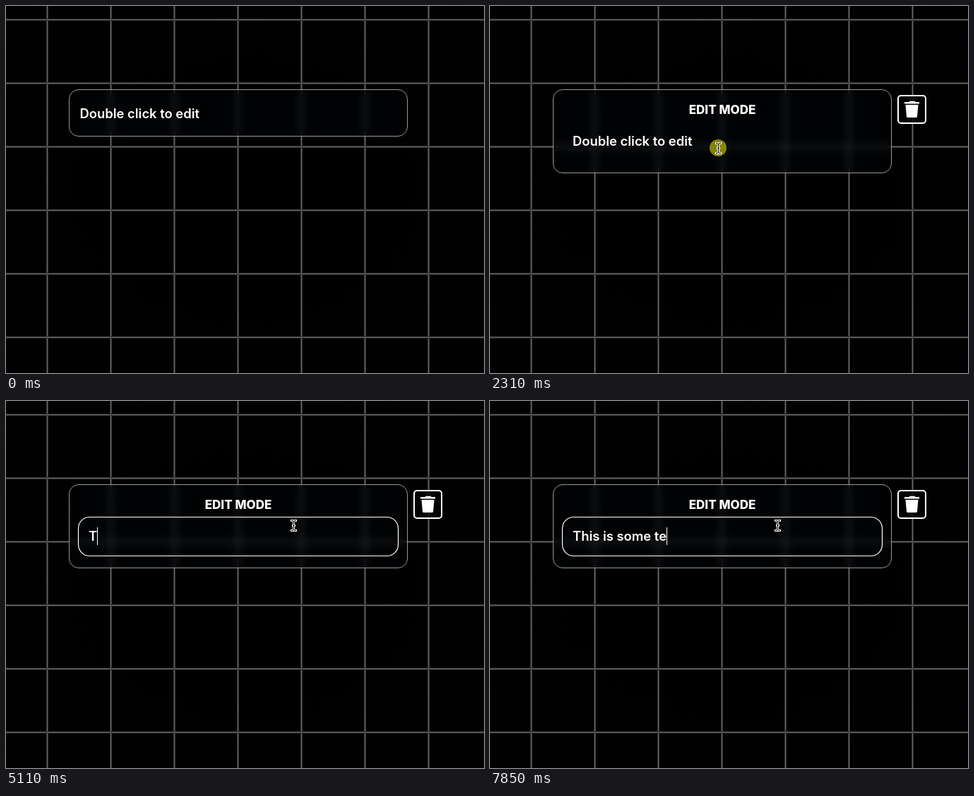
An HTML page that plays this animation: 677x520 px, repeating every 8 s.

```html
<!DOCTYPE html>
<html lang="en">
<head>
<meta charset="utf-8">
<title>Inline edit</title>
<style>
  html, body { margin: 0; width: 100%; height: 100%; overflow: hidden; background: #000; }
  .grid {
    --line: #323232 1px, #646464 1px 2px, #323232 2px 3px, transparent 3px;
    position: absolute; inset: 0;
    background:
      linear-gradient(var(--line)) 0 18px / 90px 90px,
      linear-gradient(90deg, var(--line)) 57px 0 / 90px 90px,
      radial-gradient(#000 40%, #020203);
  }
  .glass {
    position: absolute; box-sizing: border-box;
    background: rgba(5, 8, 14, .35);
    backdrop-filter: blur(5.5px);
  }
  .card {
    left: 89px; top: 118px; width: 480px; height: 67px;
    border: 1px solid #979797; border-radius: 14px;
  }
  .card.editing { height: 119px; }
  .delete {
    left: 577px; top: 126px; width: 41px; height: 41px;
    border: 2px solid #fff; border-radius: 5px;
  }
  svg { position: absolute; left: 0; top: 0; }
  text { font: 600 18.4px Inter, "Open Sans", sans-serif; fill: #fff; white-space: pre; }
  .title { font-size: 17px; font-weight: 800; text-anchor: middle; }
</style>
</head>
<body>
<div class="grid"></div>
<div class="glass card" id="card"></div>
<div class="glass delete" id="delete"></div>
<svg width="677" height="520" viewBox="0 0 677 520">
  <defs>
    <path id="beamShape" fill="none" stroke-linecap="square"
      d="M-3-7H-1.5L0-6L1.5-7H3M-3 7H-1.5L0 6L1.5 7H3M0-6V6M-1 0H1"/>
  </defs>
  <g id="editor">
    <text class="title" x="329" y="153">EDIT MODE</text>
    <path fill="#fff" d="M587 136H593.5L594.5 134.7H601.5L602.5 136H608V138.6H587Z
      M588.5 140H606.5L605 156.5Q604.8 158 603.5 158H591.5Q590.2 158 590 156.5Z"/>
  </g>
  <rect id="field" x="102.5" y="164.5" width="453" height="55" rx="16" fill="none" stroke="#fff" stroke-width="1.2"/>
  <rect id="selection" x="117" y="178" height="27" fill="#0037a1"/>
  <text id="label"></text>
  <rect id="caret" y="179" width="1" height="25" fill="#fff"/>
  <g id="pointer">
    <circle id="click" r="12" fill="#ff0" fill-opacity=".5"/>
    <path id="arrow" d="M.5 .5V13.5L3.5 10.8L5.7 16L7.8 15.1L5.7 10H9.7Z" fill="#000" stroke="#fff"/>
    <g id="beam" transform="translate(.5 .5)">
      <use href="#beamShape" stroke="#fff" stroke-width="3"/>
      <use href="#beamShape" stroke="#000"/>
    </g>
  </g>
</svg>
<script>
const LOOP = 8000;
const PROMPT = 'Double click to edit';
const TYPED = 'This is some te';
const KEY_TIMES = [5110, 5370, 5720, 5920, 6000, 6070, 6240, 6570,
                   6900, 7050, 7230, 7450, 7650, 7750, 7850];
const EDIT = 1820, FOCUS = 2380, SELECT = 2990, CLEAR = 3850, BLINK = 530;
const CLICKS = [[1480, 1550], [1620, 1750], [2310, FOCUS]];
const MOVES = [
  { start: 990, end: 1350, steps: 5, from: [668, 261], to: [307, 159] },
  { start: 1820, end: 2240, steps: 6, from: [307, 159], to: [323, 201] },
  { start: 2640, end: 2920, steps: 4, from: [323, 201], to: [407, 176] }
];

const $ = id => document.getElementById(id);
const show = (id, visible) => { $(id).style.visibility = visible ? 'visible' : 'hidden'; };
const within = (t, [start, end]) => t >= start && t < end;

// The pointer is sampled at a coarse rate, so it moves in small jumps.
function pointerAt(t) {
  const move = MOVES.filter(m => t >= m.start).pop() || MOVES[0];
  const progress = Math.min(1, Math.max(0, (t - move.start) / (move.end - move.start)));
  const stepped = Math.floor(progress * move.steps + 1e-6) / move.steps;
  const eased = 1 - (1 - stepped) ** 2;
  return move.from.map((a, i) => a + (move.to[i] - a) * eased);
}

function caretVisible(t, typedCount) {
  if (t < FOCUS || within(t, [SELECT, CLEAR])) return false;
  const since = typedCount ? KEY_TIMES[typedCount - 1] : t >= CLEAR ? CLEAR : FOCUS;
  return Math.floor((t - since) / BLINK) % 2 === 0;
}

function draw(t) {
  const editing = t >= EDIT;
  const typedCount = KEY_TIMES.filter(k => t >= k).length;
  const label = $('label');

  $('card').classList.toggle('editing', editing);
  show('delete', editing);
  show('editor', editing);
  show('field', t >= FOCUS);

  label.textContent = t < CLEAR ? PROMPT : TYPED.slice(0, typedCount);
  label.setAttribute('x', editing ? 117 : 104.5);
  label.setAttribute('y', editing ? 198 : 159);
  const width = label.textContent ? label.getComputedTextLength() : 0;

  $('selection').setAttribute('width', width);
  show('selection', within(t, [SELECT, CLEAR]));
  $('caret').setAttribute('x', Math.round(117 + width));
  show('caret', caretVisible(t, typedCount));

  const [x, y] = pointerAt(t).map(Math.round);
  const overField = editing && y > 164;
  const pointerShown = t >= MOVES[0].start;
  $('pointer').setAttribute('transform', `translate(${x} ${y})`);
  show('arrow', pointerShown && !overField);
  show('beam', pointerShown && overField);
  show('click', CLICKS.some(span => within(t, span)));
}

const begin = performance.now();
function frame() {
  draw((performance.now() - begin) % LOOP);
  requestAnimationFrame(frame);
}
frame();
</script>
</body>
</html>
```
